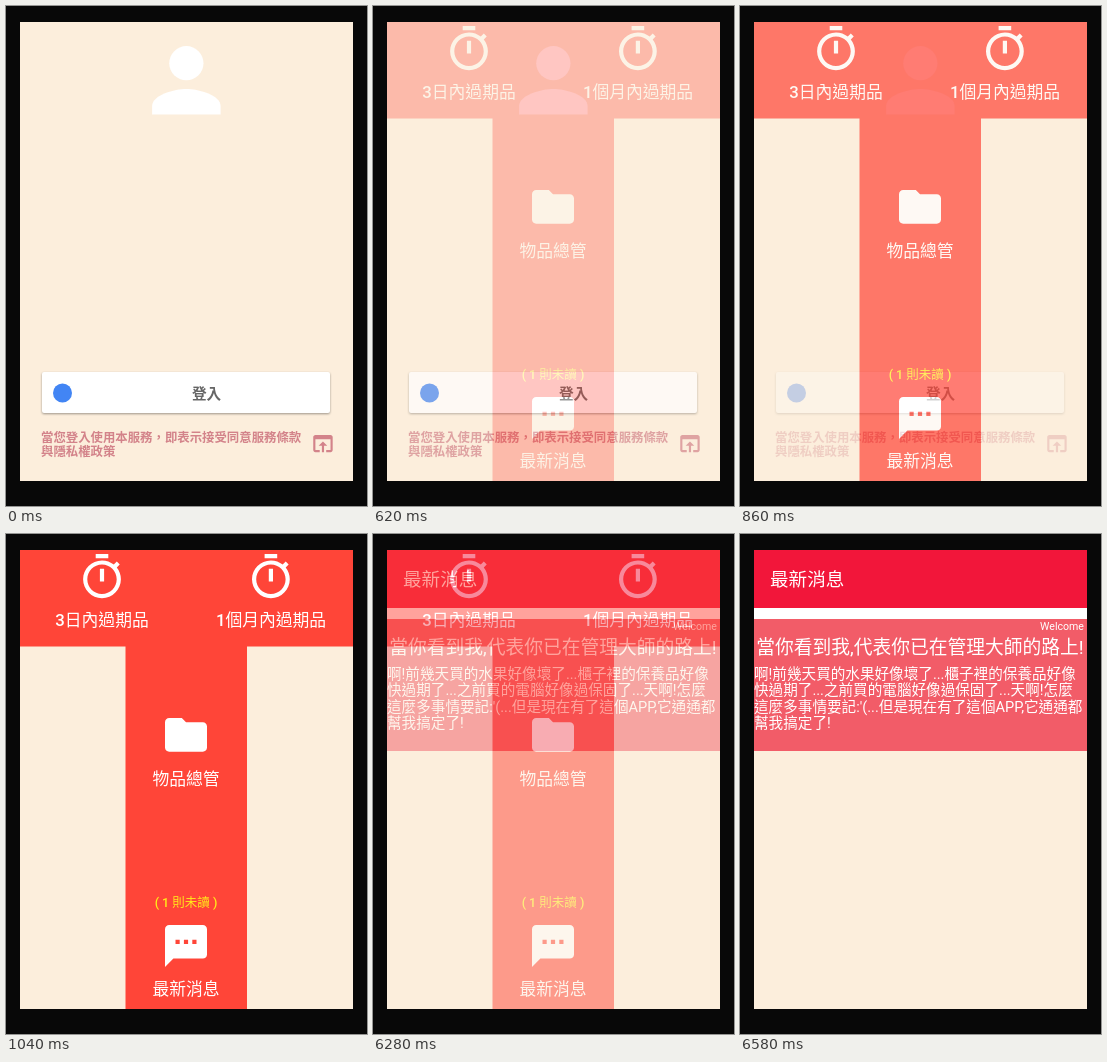
Recreate the animation shown at these times as an HTML page. Size 361 by 500 pixels, loop 8000 ms.

```html
<!DOCTYPE html>
<html lang="zh-Hant">
<head>
<meta charset="utf-8">
<title>App screens</title>
<style>
html, body { margin: 0; width: 100%; height: 100%; overflow: hidden; background: #080808; }
svg { display: block; width: 361px; height: 500px; }
text { font-family: Roboto, "Noto Sans CJK TC", "Noto Sans CJK", sans-serif; fill: #fff; white-space: pre; }
.label { font-size: 16.8px; font-weight: 500; text-anchor: middle; }
.unread { font-size: 12.5px; font-weight: 500; text-anchor: middle; fill: #ffeb1a; }
.terms { font-size: 12.4px; font-weight: 700; fill: #d3838a; }
.signin { font-size: 14.6px; font-weight: 700; text-anchor: middle; fill: #666; }
.button { fill: #fff; filter: drop-shadow(0 1.5px 1.2px rgba(0, 0, 0, .38)); }
.cream { fill: #fceedc; }
.icon { fill: #fff; }
.body { font-size: 14.6px; }
</style>
</head>
<body>
<svg viewBox="0 0 361 500">
  <defs>
    <rect id="page" class="cream" x="14" y="16" width="333" height="459"/>
    <path id="timer" class="icon" d="M15 1H9v2h6V1zm-4 13h2V8h-2v6zm8.03-6.61l1.42-1.42c-.43-.51-.9-.99-1.41-1.41l-1.42 1.42C16.07 4.74 14.12 4 12 4c-4.97 0-9 4.03-9 9s4.02 9 9 9 9-4.03 9-9c0-2.12-.74-4.07-1.97-5.61zM12 20c-3.87 0-7-3.13-7-7s3.13-7 7-7 7 3.13 7 7-3.13 7-7 7z"/>
  </defs>
  <rect width="361" height="500" fill="#080808"/>

  <g id="login">
    <use href="#page"/>
    <g class="icon" transform="translate(129 23) scale(4.28)">
      <circle cx="12" cy="8" r="4"/>
      <path d="M12 14c-2.67 0-8 1.34-8 4v2h16v-2c0-2.66-5.33-4-8-4z"/>
    </g>
    <rect class="button" x="36" y="366" width="288" height="41" rx="2"/>
    <circle cx="56.5" cy="387" r="9.5" fill="#4285f4"/>
    <text class="signin" x="200.5" y="392.5">登入</text>
    <text class="terms" x="35" y="435.5">當您登入使用本服務，即表示接受同意服務條款</text>
    <text class="terms" x="35" y="450">與隱私權政策</text>
    <path fill="#d3838a" transform="translate(304 424.6) scale(1.08)" d="M19 4H5c-1.11 0-2 .9-2 2v12c0 1.1.89 2 2 2h4v-2H5V8h14v10h-4v2h4c1.1 0 2-.9 2-2V6c0-1.1-.89-2-2-2zm-7 6l-4 4h3v6h2v-6h3l-4-4z"/>
  </g>

  <g id="home">
    <use href="#page"/>
    <path fill="#ff4538" d="M14 16H347V112.5H241V475H119.5V112.5H14z"/>
    <use href="#timer" transform="translate(70.8 18) scale(2.1)"/>
    <use href="#timer" transform="translate(239.7 18) scale(2.1)"/>
    <text class="label" x="96" y="92">3日內過期品</text>
    <text class="label" x="265" y="92">1個月內過期品</text>
    <path class="icon" transform="translate(154.8 175.7) scale(2.1)" d="M10 4H4c-1.1 0-1.99.9-1.99 2L2 18c0 1.1.9 2 2 2h16c1.1 0 2-.9 2-2V8c0-1.1-.9-2-2-2h-8l-2-2z"/>
    <text class="label" x="180" y="251">物品總管</text>
    <text class="unread" x="180" y="372.5">( 1 則未讀 )</text>
    <path class="icon" transform="translate(154.8 386.8) scale(2.1)" d="M20 2H4c-1.1 0-1.99.9-1.99 2L2 22l4-4h14c1.1 0 2-.9 2-2V4c0-1.1-.9-2-2-2zM9 11H7V9h2v2zm4 0h-2V9h2v2zm4 0h-2V9h2v2z"/>
    <text class="label" x="180" y="460.5">最新消息</text>
  </g>

  <g id="news">
    <use href="#page"/>
    <rect x="14" y="16" width="333" height="58" fill="#f2163a"/>
    <rect x="14" y="74" width="333" height="11" fill="#fff"/>
    <rect x="14" y="85" width="333" height="132" fill="#f25c68"/>
    <text x="30" y="52" font-size="18.6">最新消息</text>
    <text x="344" y="96" font-size="10.6" text-anchor="end">Welcome</text>
    <text x="180" y="120" font-size="18.75" text-anchor="middle">當你看到我,代表你已在管理大師的路上!</text>
    <g class="body">
      <text x="14" y="144.5">啊!前幾天買的水果好像壞了...櫃子裡的保養品好像</text>
      <text x="14" y="161.2">快過期了...之前買的電腦好像過保固了...天啊!怎麼</text>
      <text x="14" y="177.8">這麼多事情要記:'(...但是現在有了這個APP,它通通都</text>
      <text x="14" y="194.4">幫我搞定了!</text>
    </g>
  </g>
</svg>
<script>
const LOOP = 8000, STEP = 60, STEPS = 10;
const home = document.getElementById('home');
const news = document.getElementById('news');

// Stepped cross-fade: the first step is already visible at the start time.
function fade(time, start) {
  const step = Math.floor((time - start) / STEP) + 1;
  return Math.max(0, Math.min(STEPS, step)) / STEPS;
}

function draw() {
  const time = performance.now() % LOOP;
  home.setAttribute('opacity', fade(time, 500));
  news.setAttribute('opacity', fade(time, 6040));
  requestAnimationFrame(draw);
}
draw();
</script>
</body>
</html>
```
